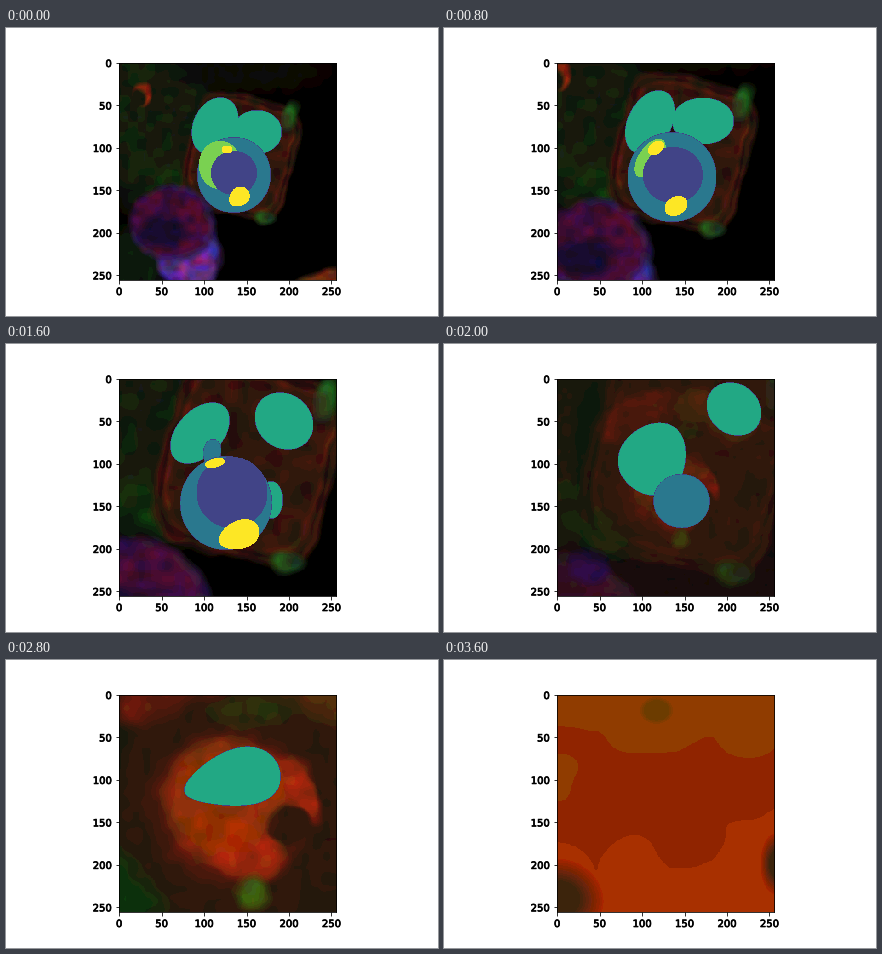
Write a matplotlib script that moves like this. It is 432x288 px and loops after 4 s.

```python
import numpy as np
import matplotlib.pyplot as plt
from matplotlib.animation import FuncAnimation
from matplotlib.colors import to_rgb
from matplotlib.patches import Polygon
from matplotlib.patheffects import withStroke

FRAMES, INTERVAL = 10, 400
SIZE = 256
LEFT, TOP, SCALE = 112.68, 34.56, 217.44 / SIZE
CENTER_X, CENTER_Y = 222, 144

TEAL, BLUE, VIOLET = '#22a884', '#2a788e', '#414487'
GREEN, YELLOW = '#7ad151', '#fde725'

# Each part: colour and its oval at a few key times, in stage pixels
# (x, y, rx, ry, degrees, bend, taper).
PARTS = [
    (TEAL, {0: (209, 98, 21, 29, 25), 2: (206, 94, 21, 33, 28),
            4: (194, 89, 22, 35, 43), 6: (222, 143, 43, 37, 8, .3, .15),
            7: (226, 120, 48, 27, -12, .1, .35),
            8: (251, 102, 44, 26, 48, .25, -.1)}),
    (TEAL, {0: (251, 104, 24, 21), 2: (259, 93, 30, 22.5),
            4: (278, 77, 30, 26, 40), 5: (290, 65, 28, 24, 40)}),
    (TEAL, {4: (265, 156, 11, 18)}),
    (BLUE, {4: (206, 108, 8, 12, 10)}),
    (BLUE, {0: (228, 147, 36, 37), 2: (228, 149, 43.5, 44),
            4: (220, 159, 45, 46, 10), 6: (255, 155, 9.5, 6)}),
    (GREEN, {0: (214, 137, 20, 23), 2: (206, 130, 10, 21, 35)}),
    (VIOLET, {0: (228, 145, 22, 21), 2: (229, 147, 29, 27),
              4: (226, 148.5, 34.5, 34.5)}),
    (YELLOW, {0: (221, 121.5, 4, 3), 2: (212, 120, 8, 5, -40),
              4: (209, 119, 9, 3.5, -15)}),
    (YELLOW, {0: (233, 169, 10, 8, -40, 0, .2), 2: (232, 178, 11, 8, -30),
              4: (233, 191, 20, 13, -20, 0, .15)}),
]

# Soft ellipses: x, y, rx, ry, degrees, colour, edge softness.
LUNG = [
    (145, 95, 62, 85, 0, '#131c0e', .4),
    (245, 42, 62, 22, 0, '#0b0906', .8),
    (125, 235, 32, 32, 0, '#0a180a', .5),
    (172, 158, 26, 11, 38, '#142e0e', .8),
    (136, 66, 8, 11, 0, '#94200f', .5),
    (132, 69, 7, 9, 0, '#1a180d', .5),
    (318, 256, 46, 12, -18, '#6a2812', .5),
]
FAT = [
    (283, 88, 7, 13, 20, '#24501a', .8),
    (259, 190, 9, 6, 0, '#1f481a', .8),
]
LIVER = [
    (182, 229, 31, 32, 0, '#46288a', .25),
    (190, 240, 17, 18, 0, '#6e288a', .6),
    (167, 197, 41, 37, 0, '#2a2068', .2),
    (165, 195, 39, 35, 0, '#430c34', .3),
    (156, 204, 22, 16, 0, '#160a2c', .6),
]
HEART = [
    (122, 110, 24, 120, 0, '#0e170c', .5),
    (145, 205, 26, 34, -30, '#10300e', .7),
    (120, 248, 28, 22, 20, '#200a4c', .5),
    (188, 52, 56, 30, -25, '#6a1e08', .3),
    (285, 50, 62, 34, 14, '#543008', .4),
    (228, 140, 92, 86, 0, '#2e150d', .3),
    (240, 74, 30, 13, 0, '#2c2c10', .7),
    (222, 146, 56, 54, 0, '#5a1c0a', .35),
    (224, 142, 47, 44, 0, '#862a08', .3),
    (278, 136, 9, 24, -28, '#94240a', .5),
    (236, 178, 25, 22, 30, '#98260a', .5),
    (240, 212, 13, 12, -25, '#3c5212', .7),
    (268, 160, 17, 14, 0, '#2e180e', .3),
]
GLOW = [
    (217, 138, 44, 43, 0, '#903404', .25),
    (228, 176, 40, 20, 25, '#a62a04', .35),
    (265, 126, 20, 18, 20, '#a42a04', .4),
    (270, 161, 17, 14, 0, '#30180d', .25),
]
CORNERS = [
    (212, 51, 15, 12, 0, '#703c04', .3),
    (118, 238, 30, 27, 30, '#40200a', .8),
    (331, 204, 11, 22, 0, '#40200a', .8),
]

rng = np.random.default_rng(4)
LATTICE = rng.uniform(-1, 1, (3, 64, 64))
span = np.arange(SIZE) + .5
PX, PY = np.meshgrid(LEFT + span * SCALE, TOP + span * SCALE)


def noise(u, v, cell, layer=0):
    """Smooth value noise in -1..1."""
    i, j = (np.floor(w / cell).astype(int) for w in (u, v))
    fx, fy = u / cell - i, v / cell - j
    fx, fy = fx * fx * (3 - 2 * fx), fy * fy * (3 - 2 * fy)

    def row(b):
        left, right = (LATTICE[layer, (j + b) % 64, (i + a) % 64]
                       for a in (0, 1))
        return left + fx * (right - left)
    return row(0) + fy * (row(1) - row(0))


def paint(rgb, u, v, blobs, opacity=1, power=2):
    for cx, cy, rx, ry, deg, color, edge in blobs:
        c, s = np.cos(np.radians(deg)), np.sin(np.radians(deg))
        dx, dy = u - cx, v - cy
        d = (np.abs((c * dx + s * dy) / rx)**power
             + np.abs((c * dy - s * dx) / ry)**power)**(1 / power)
        a = np.clip((1 - d) / edge + .5, 0, 1)[..., None] * opacity
        rgb += a * (np.array(to_rgb(color)) - rgb)


def canvas(base):
    return np.ones((SIZE, SIZE, 3)) * to_rgb(base)


def zoomed(zoom):
    """Scene coordinates, plus a copy wobbled for organic edges."""
    u = CENTER_X + (PX - CENTER_X) / zoom
    v = CENTER_Y + (PY - CENTER_Y) / zoom
    return u, v, u + 2 * noise(u, v, 11, 0), v + 2 * noise(u, v, 11, 1)


def grain(u, v, amount):
    tone = [noise(u, v, cell, layer) for layer, cell in enumerate((8, 9, 6))]
    return 1 + amount * np.stack(tone, -1)


def chest(k):
    u, v, wu, wv = zoomed(1 + .09 * k + .016 * k * k)
    rgb = canvas('#040302')
    paint(rgb, wu, wv, LUNG)
    # The heart sac is a tilted rounded box: rim, gap, lining, inside.
    sac = ['#3c160e', '#1c0e08', '#4c1a10', '#32150c']
    paint(rgb, wu, wv, [(234, 128, 53 - 3 * n, 59 - 3 * n, 15, color, .08)
                        for n, color in enumerate(sac)], power=5)
    paint(rgb, wu, wv, FAT)
    paint(rgb, wu, wv - 4.5 * k, LIVER)
    return rgb * grain(u, v, .35)


def heart(k):
    u, v, wu, wv = zoomed(1.32**(k - 6))
    rgb = canvas('#26150c')
    paint(rgb, wu, wv, HEART)
    paint(rgb, wu, wv, GLOW, max(0, (k - 6) / 2))
    return rgb * grain(u, v, .2 - .05 * max(0, k - 6))


def close_up():
    rgb = canvas('#932902')
    tone = (PY - CENTER_Y) / 108 + .4 * noise(PX, PY, 38)
    rgb[tone < -.4] = to_rgb('#903802')
    rgb[tone > .35] = to_rgb('#a82a02')
    paint(rgb, PX, PY, CORNERS)
    return rgb


def backdrop(k):
    if k == FRAMES - 1:
        rgb = close_up()
    elif k == 5:
        rgb = (chest(k) + heart(k)) / 2
    else:
        rgb = chest(k) if k < 5 else heart(k)
    step = 12 / 255
    return np.clip(np.round(rgb / step) * step, 0, 1)


def oval(cx, cy, rx, ry, deg, bend, taper):
    """Ellipse, bent and tapered along its x axis, in image coordinates."""
    t = np.linspace(0, 2 * np.pi, 160)
    x = np.cos(t)
    y = np.sin(t) * (1 + taper * x) + bend * (x * x - .5)
    x, y, a = x * rx, y * ry, np.radians(deg)
    px = cx + x * np.cos(a) - y * np.sin(a)
    py = cy + x * np.sin(a) + y * np.cos(a)
    return np.column_stack([px - LEFT, py - TOP]) / SCALE - .5


def pose(keys, k):
    times = list(keys)
    if not times[0] <= k <= times[-1]:
        return None
    rows = [row + (0,) * (7 - len(row)) for row in keys.values()]
    return oval(*(np.interp(k, times, column) for column in zip(*rows)))


fig, ax = plt.subplots(figsize=(6, 4), dpi=72)
fig.subplots_adjust(left=.125, right=.9, bottom=.125, top=.88)
picture = ax.imshow(np.zeros((SIZE, SIZE, 3)), interpolation='nearest')
ax.set_xticks(range(0, 251, 50))
ax.set_yticks(range(0, 251, 50))
for label in ax.get_xticklabels() + ax.get_yticklabels():
    label.set_path_effects([withStroke(linewidth=.7, foreground='black')])


def add_patch(order, **style):
    patch = Polygon([(0, 0), (1, 1), (0, 1)], antialiased=False,
                    zorder=1.1 + order / 20, **style)
    return ax.add_patch(patch)


shapes = []
for order, (color, keys) in enumerate(PARTS):
    fill = add_patch(order + 1, fc=color, ec='none')
    # Teal rims lie below every fill so that joined lobes show no seam.
    rim = add_patch(0 if color == TEAL else order + .5, fc='none', lw=1,
                    ec=VIOLET if color in (TEAL, BLUE) else color)
    shapes.append((keys, (fill, rim)))


def update(k):
    picture.set_data(backdrop(k))
    for keys, patches in shapes:
        xy = pose(keys, k)
        for patch in patches:
            patch.set_visible(xy is not None)
            if xy is not None:
                patch.set_xy(xy)
    return [picture]


anim = FuncAnimation(fig, update, frames=FRAMES, interval=INTERVAL,
                     repeat=True, repeat_delay=0, blit=False)
plt.show()
```
